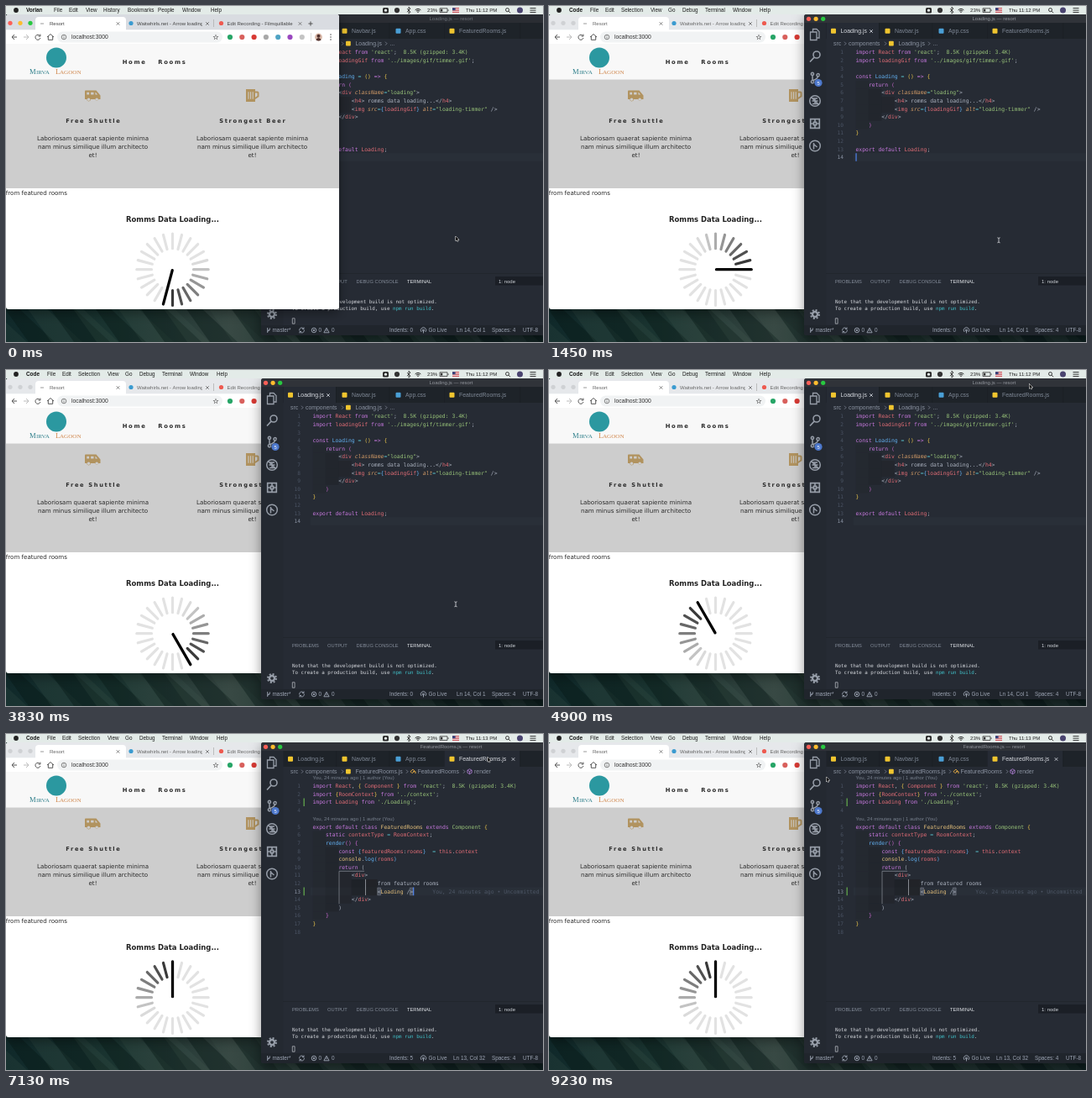
An HTML page with a canvas that plays this animation: 640 px wide and 400 px high, repeating every 9360 ms.

```html
<!DOCTYPE html>
<html lang="en">
<head>
<meta charset="utf-8">
<title>Loading screen recording</title>
<style>
html, body { margin: 0; width: 100%; height: 100%; overflow: hidden; background: #12282b; }
canvas { display: block; }
</style>
</head>
<body>
<canvas id="stage" width="640" height="400"></canvas>
<script>
const ctx = document.getElementById('stage').getContext('2d');
const SANS = '"Liberation Sans", Arial, sans-serif';
const PAGE = '"DejaVu Sans", Verdana, sans-serif';
const MONO = '"DejaVu Sans Mono", monospace';
const SERIF = '"Liberation Serif", serif';
const LOOP = 9360, FOCUS = 100, OPEN_FILE = 5820;

// ---------- helpers ----------
function rect(x, y, w, h, color, r = 0) {
  ctx.fillStyle = color;
  ctx.beginPath();
  ctx.roundRect(x, y, w, h, r);
  ctx.fill();
}

function dot(x, y, r, color) {
  ctx.fillStyle = color;
  ctx.beginPath();
  ctx.arc(x, y, r, 0, 7);
  ctx.fill();
}

// y is the middle of the capital letters
function text(s, x, y, size, color, { font = SANS, style = '', align = 'left', spacing = 0 } = {}) {
  ctx.font = `${style} ${size}px ${font}`;
  ctx.letterSpacing = spacing + 'px';
  ctx.textAlign = align;
  ctx.fillStyle = color;
  ctx.fillText(s, x, y + size * .35);
  ctx.letterSpacing = '0px';
}

function stroke(d, x, y, color, width = 1) {
  ctx.save();
  ctx.translate(x, y);
  ctx.strokeStyle = color;
  ctx.lineWidth = width;
  ctx.stroke(new Path2D(d));
  ctx.restore();
}

function fill(d, x, y, color, rule = 'nonzero') {
  ctx.save();
  ctx.translate(x, y);
  ctx.fillStyle = color;
  ctx.fill(new Path2D(d), rule);
  ctx.restore();
}

const ring = r => `M${r} 0A${r} ${r} 0 1 1 ${-r} 0A${r} ${r} 0 1 1 ${r} 0`;
const CROSS = 'M-1.8-1.8L1.8 1.8M1.8-1.8L-1.8 1.8';
const LENS = 'M1.6 1.6L3.6 3.6' + ring(2);

function windowBase(x, y, w, h, color) {
  ctx.save();
  ctx.shadowColor = 'rgba(0,0,0,.4)';
  ctx.shadowBlur = 14;
  ctx.shadowOffsetY = 4;
  rect(x, y, w, h, color, 3);
  ctx.restore();
}

function lights(x, y, gap, colors) {
  colors.forEach((c, i) => dot(x + i * gap, y, 2.6, c));
}
const RGB_LIGHTS = ['#fc5f57', '#fdbc2e', '#28c840'];

// ---------- desktop ----------
function wallpaper() {
  const g = ctx.createLinearGradient(0, 380, 640, 380);
  g.addColorStop(0, '#10292a');
  g.addColorStop(.2, '#1a3430');
  g.addColorStop(.42, '#344440');
  g.addColorStop(.6, '#1b2b2a');
  g.addColorStop(1, '#111f22');
  ctx.fillStyle = g;
  ctx.fillRect(0, 0, 640, 400);
  for (let i = 0; i < 24; i++) {
    const w = 10 + i * 29 % 23, color = i % 2 ? 'rgba(6,24,22,.4)' : 'rgba(74,98,88,.16)';
    fill(`M0 0L${w} 0L${w + 45} 42L${30} 42Z`, i * 27 - 30, 358, color);
  }
}

function menuBar(inCode, clock) {
  rect(0, 0, 640, 10, '#e3ebe8');
  dot(12, 5, 2.9, '#222');
  const app = inCode ? 'Code' : 'Vorlan';
  const names = inCode
    ? ['File', 'Edit', 'Selection', 'View', 'Go', 'Debug', 'Terminal', 'Window', 'Help']
    : ['File', 'Edit', 'View', 'History', 'Bookmarks', 'People', 'Window', 'Help'];
  const at = inCode ? [49, 67, 86, 121, 142, 159, 186, 219, 251] : [57, 75, 95, 116, 145, 181, 210, 244];
  text(app, 24, 5.1, 6.4, '#111', { style: 'bold' });
  names.forEach((n, i) => text(n, at[i], 5.1, 6.3, '#1c1c1c'));
  rect(449, 2, 7, 6.5, '#2b2b2b', 1.5);
  dot(452.5, 5.2, 1.6, '#e3ebe8');
  dot(466, 5.1, 3.1, '#333');
  stroke('M-2-2L2 2L0 4V-4L2-2L-2 2', 480, 5.1, '#222', .8);
  for (const r of [1.2, 3, 4.8]) stroke(`M${-r * .7} ${-r * .7}A${r} ${r} 0 0 1 ${r * .7} ${-r * .7}`, 491, 8.2, '#222');
  text('23%', 502, 5.1, 6.1, '#222');
  stroke('M0 0H9V4.6H0ZM10 1.5V3.2', 517, 2.8, '#333', .8);
  rect(518, 3.7, 2.3, 2.8, '#333');
  rect(532, 2.2, 8, 5.8, '#f4f0f0');
  for (let i = 0; i < 4; i++) rect(532, 2.2 + i * 1.6, 8, .8, '#c5353e');
  rect(532, 2.2, 3.6, 3, '#34437c');
  text(clock, 548, 5.1, 6, '#1c1c1c');
  stroke(LENS, 597.5, 4.6, '#222', .9);
  dot(612.5, 5, 3.5, '#4a4470');
  stroke('M0 0H7M0 2.5H7M0 5H7', 624.5, 2.6, '#222', .9);
}

// ---------- browser ----------
function browserTab(title, x, icon, closeX, color) {
  dot(x - 7, 20.5, 2.6, icon);
  ctx.save();
  ctx.beginPath();
  ctx.rect(x, 12, closeX - x - 6, 16);
  ctx.clip();
  text(title, x, 21, 6, color);
  ctx.restore();
  stroke(CROSS, closeX, 21, '#666', .8);
}

function browser(active) {
  const strip = active ? '#d9dce1' : '#e6e8eb', ink = active ? '#444' : '#666';
  windowBase(0, 10, 397, 351, '#fff');
  rect(0, 10, 397, 18.5, strip, [3, 3, 0, 0]);
  lights(5, 20.3, 12, active ? RGB_LIGHTS : Array(3).fill('#cfd1d4'));
  rect(35, 13, 108, 16, '#fff', [4, 4, 0, 0]);
  rect(41, 20.5, 4, 1, '#999');
  text('Resort', 52, 21, 6, ink);
  stroke(CROSS, 133.5, 21, '#666', .8);
  browserTab('Waitwhirls.net - Arrow loading', 156, '#3b9bd0', 240, ink);
  rect(247, 16, .7, 9, '#aaa');
  browserTab('Edit Recording - Filmquillable', 263.5, '#ee5a50', 350.5, ink);
  stroke('M-2.6 0H2.6M0-2.6V2.6', 363, 21, '#555');

  rect(0, 28.5, 397, 16.5, '#fff');
  stroke('M3 0H-3L0-3M-3 0L0 3', 10, 37, '#555');
  stroke('M-3 0H3L0-3M3 0L0 3', 24, 37, '#bbb');
  stroke('M2.4-1.5A3 3 0 1 0 2.9 1M2.9-3.4V-1H.5', 38, 37, '#555');
  stroke('M-4 0L0-3.5L4 0M-2.7-1V3.3H2.7V-1', 53, 37, '#555');
  rect(61, 30.5, 197, 13, '#f1f3f4', 6.5);
  stroke(ring(2.8) + 'M0-.5V1.6M0-1.7V-1', 69, 37, '#666', .8);
  text('localhost:3000', 78, 37, 6.8, '#333');
  fill('M0-3.6L1-1.1L3.5-1L1.5 .7L2.2 3.3L0 1.8L-2.2 3.3L-1.5 .7L-3.5-1L-1-1.1ZM0-2L-.6-.4L-2-.3L-.9.5L-1.3 2L0 1.1L1.3 2L.9.5L2-.3L.6-.4Z', 250, 37, '#666', 'evenodd');
  ['#27a567', '#d8605c', '#d83a34', '#a8a8a8', '#4fa3c4', '#9a48c0', '#c4c4c4']
    .forEach((c, i) => dot(267 + i * 14.3, 37, 3.1, c));
  rect(363, 32, .7, 10, '#ccc');
  dot(372.5, 37, 4.4, '#d9b8a8');
  dot(372.5, 35.7, 2, '#50302c');
  fill('M-3.2 3.3Q0-1.5 3.2 3.3Q0 5.8-3.2 3.3Z', 372.5, 37, '#50302c');
  for (const y of [34, 37, 40]) dot(387, y, .8, '#555');

  page();
}

function service(x, title, iconPath) {
  const o = { font: PAGE, align: 'center' };
  fill(iconPath, x, 106.5, '#b1935f', 'evenodd');
  text(title, x + .8, 137, 6.67, '#2a2a2a', { ...o, style: 'bold', spacing: 1.67 });
  ['Laboriosam quaerat sapiente minima', 'nam minus similique illum architecto', 'et!']
    .forEach((line, i) => text(line, x, 157.2 + i * 10, 7.1, '#2a2a2a', o));
}

function page() {
  const bold = { font: PAGE, style: 'bold', spacing: 1.67 };
  rect(0, 45, 397, 42.5, '#f8f8f8');
  dot(60, 61.5, 12, '#2b98a0');
  text('M', 28, 78, 8.6, '#2f7f8b', { font: SERIF });
  text('IRVA', 36, 78.4, 7.1, '#2f7f8b', { font: SERIF });
  text('L', 59, 78, 8.6, '#cf8448', { font: SERIF });
  text('AGOON', 64, 78.4, 7.1, '#cf8448', { font: SERIF });
  text('Home', 138.7, 66.5, 6.8, '#2a2a2a', bold);
  text('Rooms', 181.3, 66.5, 6.8, '#2a2a2a', bold);
  rect(0, 87.5, 397, 129.5, '#cdcdcd');
  service(103.5, 'Free Shuttle',
    'M-9-6H4L9 0V4.5H7A2.4 2.4 0 0 1 2.4 4.5H-2.5A2.4 2.4 0 0 1-7.3 4.5H-9.5V-5ZM-7.2-3.7V-1H-4.4V-3.7ZM-2.4-3.7V-1H1V-3.7ZM3-3.7V-1H5.6L3.3-3.7ZM-6.8 4.8A1.8 1.8 0 1 0-3.2 4.8A1.8 1.8 0 1 0-6.8 4.8ZM2.9 4.8A1.8 1.8 0 1 0 6.5 4.8A1.8 1.8 0 1 0 2.9 4.8Z');
  service(293.5, 'Strongest Beer',
    'M-7.5-7.5H3.5V-5H6Q8-5 8-3V1.5L3.5 4.5V7.5H-7.5ZM3.5-3V2.2L6 .6V-3ZM-5-4.3V4.3H-4V-4.3ZM-2.4-4.3V4.3H-1.4V-4.3ZM.2-4.3V4.3H1.2V-4.3Z');
  text('from featured rooms', -.2, 222.5, 7.1, '#2a2a2a', { font: PAGE });
  text('Romms Data Loading...', 198.5, 254, 8.48, '#222', { font: PAGE, style: 'bold', align: 'center' });
}

// 24 spokes, the long one steps by 15 degrees and the ones behind it fade out
function spinner(t) {
  const head = 13 + Math.floor(t / 86.5 + .8);
  ctx.save();
  ctx.translate(198.5, 313.7);
  ctx.lineCap = 'round';
  for (let behind = 23; behind >= 0; behind--) {
    const a = (head - behind) * Math.PI / 12, v = behind ? Math.min(226, 34 + behind * 23) : 0;
    const from = behind ? 25 : 1;
    ctx.strokeStyle = `rgb(${v},${v},${v})`;
    ctx.lineWidth = behind ? 3.2 : 3.3;
    ctx.beginPath();
    ctx.moveTo(Math.sin(a) * from, -Math.cos(a) * from);
    ctx.lineTo(Math.sin(a) * 42.7, -Math.cos(a) * 42.7);
    ctx.stroke();
  }
  ctx.restore();
}

// ---------- editor ----------
const CHAR = 3.86, CODE_X = 365.5;
const INK = { p: '#c678dd', r: '#e06c75', g: '#98c379', w: '#abb2bf', y: '#e5c07b', b: '#61afef',
  o: '#d19a66', c: '#56b6c2', k: '#e8c34a', m: '#c566c9', d: '#4d5665' };

// Each token is a colour letter followed by its text, tokens are divided by |
const LOADING = [
  "pimport |rReact |pfrom |g'react'|w;  |g8.5K (gzipped: 3.4K)",
  "pimport |rloadingGif |pfrom |g'../images/gif/timmer.gif'|w;",
  '',
  'pconst |bLoading |c= |k() |p=> |k{',
  'w    |preturn |m(',
  'w        <|rdiv |oclassName|c=|g"loading"|w>',
  'w            <|rh4|w> romms data loading...</|rh4|w>',
  'w            <|rimg |osrc|c=|b{|rloadingGif|b} |oalt|c=|g"loading-timmer" |w/>',
  'w        </|rdiv|w>',
  'w    |m)',
  'k}',
  '',
  'pexport default |rLoading|w;',
  ''
];
const ROOMS = [
  "pimport |rReact|w, |k{ |rComponent |k} |pfrom |g'react'|w;  |g8.5K (gzipped: 3.4K)",
  "pimport |k{|rRoomContext|k} |pfrom |g'../context'|w;",
  "pimport |rLoading |pfrom |g'./Loading'|w;",
  '',
  'pexport default class |yFeaturedRooms |pextends |gComponent |k{',
  'w    |pstatic |rcontextType |c= |rRoomContext|w;',
  'w    |brender|m() {',
  'w        |pconst |b{|rfeaturedRooms|w:|rrooms|b}  |c= |rthis|w.|rcontext',
  'w        |yconsole|w.|blog|b(|rrooms|b)',
  'w        |preturn |w(',
  'w            <|rdiv|w>',
  'w                    from featured rooms',
  'w                    <|yLoading |w/>|d      You, 24 minutes ago • Uncommitted changes',
  'w            </|rdiv|w>',
  'w        )',
  'w    |m}',
  'k}',
  ''
];

function codeLine(line, n, y, current) {
  text(n, 351, y, 6.2, n === current ? '#8a93a3' : '#4a5363', { font: MONO, align: 'right' });
  let x = CODE_X;
  for (const token of line.split('|')) {
    text(token.slice(1), x, y, 6.42, INK[token[0]] || INK.w, { font: MONO, style: token[0] === 'o' ? 'italic' : '' });
    x += Math.max(0, token.length - 1) * CHAR;
  }
}

function indents(lines, yOf) {
  lines.forEach((line, i) => {
    const cols = /^w( +)/.exec(line.split('|')[0]);
    const depth = cols ? Math.floor(cols[1].length / 4) : 0;
    for (let d = 0; d < depth; d++)
      rect(CODE_X + d * 4 * CHAR, yOf(i) - 4.8, 4 * CHAR, 9.6, `rgba(${d % 2 ? '20,24,26' : '30,30,32'},${.15 + d * .1})`);
  });
}

function caret(x, y) { rect(x, y - 4.8, 1.1, 9.6, '#528bff'); }

function editorCode(t) {
  const inRooms = t >= OPEN_FILE, lines = inRooms ? ROOMS : LOADING;
  const current = inRooms ? 13 : 14;
  const yOf = i => inRooms ? 62 + i * 9.6 + (i > 3 ? 10.2 : 0) : 55.2 + i * 9.6;
  const y = yOf(current - 1);
  rect(363, y - 4.8, 277, 9.6, '#292f38');
  indents(lines, yOf);
  if (inRooms) {
    const age = t < 7000 ? 23 : 24;
    for (const lensY of [52, 101]) text(`You, ${age} minutes ago | 1 author (You)`, 365.5, lensY, 6, '#78808e');
    for (const i of [2, 12]) rect(354.5, yOf(i) - 4.8, 1.4, 9.6, '#5c9c4a');
    stroke('M30 0H0V39', 397, 163.3, '#8d939c', .7);
    rect(428, 173, .8, 19, '#a0a5ad');
    for (const c of [20, 30]) {
      rect(CODE_X + c * CHAR, y - 4.4, CHAR, 8.8, '#4b515c');
      stroke(`M0 0H${CHAR}V8.8H0Z`, CODE_X + c * CHAR, y - 4.4, '#7d838d', .5);
    }
  }
  lines.forEach((line, i) => codeLine(line, i + 1, yOf(i), current));
  const blinkStart = inRooms ? 5720 : 260;
  if (t >= FOCUS && (t - blinkStart) % 1000 < 500) caret(inRooms ? CODE_X + 31 * CHAR : CODE_X, y);
}

function fileTab(name, x, textX, w, active, closable, isCss) {
  if (active) rect(x, 20, w, 19, '#262b34');
  rect(x + w, 20, .6, 19, '#1a1e24');
  rect(textX - 11.5, 26.8, 6, 6, isCss ? '#4a9fd6' : '#f0c52f', 1);
  text(name, textX, 30, 6.9, active ? '#d7dae0' : '#7f8896');
  if (closable) stroke(CROSS, textX + w - 25.5, 30, '#c8ccd4', .9);
}

function breadcrumb(inRooms) {
  const ink = '#8b93a1', sep = x => stroke('M-1-2L1 0L-1 2', x, 44.7, ink, .7);
  const name = inRooms ? 'FeaturedRooms' : 'Loading';
  text('src', 339, 44.7, 6.9, ink);
  sep(353);
  text('components', 357, 44.7, 6.9, ink);
  sep(401);
  rect(405, 41.7, 5.8, 5.8, '#f0c52f', 1);
  text(name + '.js', 416.5, 44.7, 6.9, ink);
  sep(inRooms ? 478 : 453);
  if (!inRooms) return text('...', 457.5, 44.7, 6.9, ink);
  stroke('M-3 0L0-2.6L2-.6L-1 2ZM0 0H3V2.4', 485, 44.7, '#d9a343');
  text(name, 490.5, 44.7, 6.9, ink);
  sep(546);
  stroke('M0-3L2.6-1.5V1.5L0 3L-2.6 1.5V-1.5ZM-2.6-1.5L0 0L2.6-1.5M0 0V3', 552.5, 44.7, '#b180d7', .8);
  text('render', 558, 44.7, 6.9, ink);
}

function activityBar() {
  const ink = '#969da8', icon = (d, y, w = 1.5) => stroke(d, 317, y, ink, w);
  icon('M-5.5-3H2V6.5H-5.5ZM-2.5-3V-6.5H2L5-3.5V4H2', 34, 1.3);
  icon('M-1.2 1.4L-6 6.5M6 -2A4 4 0 1 1-2-2A4 4 0 1 1 6-2', 60, 1.6);
  icon('M-3-3V3M-3-3A1.6 1.6 0 1 0-3.1-3M-1.4 4.6A1.6 1.6 0 1 0-1.4 4.7M5.2-3.4A1.6 1.6 0 1 0 5.2-3.3M3.6-1.8Q3 1.5-2.4 3', 85.5);
  dot(321, 91.5, 4.6, '#4d78cc');
  text('5', 321, 91.6, 5.8, '#fff', { align: 'center' });
  icon(ring(6.3) + 'M-4.5-4.5L4.5 4.5M-3.5 0H3.5M0-3.5V4M-3-3L3-3M-3 3.4H3', 113);
  icon('M-5.3-5.3H5.3V5.3H-5.3ZM-1.6-1.6H1.6V1.6H-1.6ZM0-5V-2M0 2V5M-5 0H-2M2 0H5', 140, 1.7);
  icon(ring(6.3) + 'M-1.5-3.5V4M-1.5-2L2.5 1.5', 166.5);
  icon(ring(3), 367, 2.4);
  ctx.setLineDash([2, 1.93]);
  icon(ring(5), 367, 2);
  ctx.setLineDash([]);
}

function panel() {
  rect(330, 318, 310, .8, '#1f242b');
  const tabs = { PROBLEMS: 341, OUTPUT: 383, 'DEBUG CONSOLE': 417.5, TERMINAL: 478 };
  for (const [name, x] of Object.entries(tabs)) text(name, x, 327.8, 5.75, name === 'TERMINAL' ? '#e1e4e8' : '#858d9a');
  rect(583, 322, 57, 10.5, '#1b1f26');
  text('1: node', 587, 327.6, 6, '#d0d4da');
  const mono = { font: MONO }, w = 5.86 * .602;
  text('Note that the development build is not optimized.', 341, 352.2, 5.86, '#d4d7dc', mono);
  text('To create a production build, use', 341, 360.2, 5.86, '#d4d7dc', mono);
  text('npm run build', 341 + 34 * w, 360.2, 5.86, '#41c1c9', mono);
  text('.', 341 + 47 * w, 360.2, 5.86, '#d4d7dc', mono);
  stroke('M0 0H2.8V6.4H0Z', 341.3, 371.8, '#c5c8cd', .7);
}

function statusBar(inRooms) {
  const ink = '#9da5b4', put = (s, x) => text(s, x, 386, 6.4, ink);
  rect(304, 380, 336, 12, '#20252c', [0, 0, 0, 3]);
  stroke('M-1.3-3V3M1.5-2.5Q2 .6-1.3 1.3' + ring(.3), 313, 386, ink, .9);
  put('master*', 317.5);
  stroke('M-2.8 .5A2.8 2.8 0 0 1 2.2-1.8M2.8-.5A2.8 2.8 0 0 1-2.2 1.8M2.5-3.5V-1.5H.5M-2.5 3.5V1.5H-.5', 352.5, 386, ink, .9);
  stroke(ring(2.8) + 'M-1.2-1.2L1.2 1.2M1.2-1.2L-1.2 1.2', 367, 386, ink, .9);
  put('0', 372.5);
  stroke('M0-2.8L3.1 2.8H-3.1ZM0-.8V1.2', 382, 386, ink, .9);
  put('0', 388);
  put(inRooms ? 'Indents: 5' : 'Indents: 0', 457);
  stroke('M-2.4 2A3.2 3.2 0 1 1 2.4 2M0 0V3.5' + ring(1.1), 497.5, 386, ink, .9);
  put('Go Live', 503.5);
  put(inRooms ? 'Ln 13, Col 32' : 'Ln 14, Col 1', inRooms ? 533 : 537);
  put('Spaces: 4', 579);
  put('UTF-8', 616);
}

function editor(t) {
  const inRooms = t >= OPEN_FILE;
  windowBase(304, 10, 340, 382, '#262b34');
  rect(304, 10, 336, 10, t < FOCUS ? '#2a2d33' : '#303339', [3, 0, 0, 0]);
  lights(309.5, 15.3, 8.6, RGB_LIGHTS);
  text((inRooms ? 'FeaturedRooms' : 'Loading') + '.js — resort', 530.5, 15.2, 6, t < FOCUS ? '#6d7279' : '#92969d', { align: 'center' });
  rect(304, 20, 26.5, 360, '#242931');
  rect(330.5, 20, 309.5, 19, '#1e2329');
  fileTab('Loading.js', 331, 347.5, 62, !inRooms, !inRooms);
  fileTab('Navbar.js', 393.5, 412, 63, false, false);
  fileTab('App.css', 457, 476, 65, false, false, true);
  fileTab('FeaturedRooms.js', 522.5, 540, 90, inRooms, inRooms || t > 5200);
  activityBar();
  editorCode(t);
  breadcrumb(inRooms);
  panel();
  statusBar(inRooms);
}

// ---------- pointer ----------
const PATH = [[0, 536, 274], [4040, 536, 274], [4450, 573, 3], [4640, 573, 3], [4860, 572.5, 16.5],
  [5100, 572.5, 16.5], [5650, 574, 27.5], [8900, 574, 27.5], [9230, 330.5, 51], [LOOP, 330.5, 51]];

function pointer(t) {
  const i = PATH.findIndex(p => p[0] > t);
  const [t0, x0, y0] = PATH[i - 1], [t1, x1, y1] = PATH[i];
  const u = (t - t0) / (t1 - t0), e = u * u * (3 - 2 * u);
  const x = x0 + (x1 - x0) * e, y = y0 + (y1 - y0) * e;
  if (t >= FOCUS && x > 340 && y > 48) {
    stroke('M-1.6-3Q0-3 0-2Q0-3 1.6-3M0-2.2V2.2M-1.6 3Q0 3 0 2Q0 3 1.6 3', x, y + 4.8, '#d8dade', .8);
    return;
  }
  const arrow = 'M0 0V5.6L1.3 4.5L2.1 6.3L3 5.9L2.2 4.1H3.9Z';
  stroke(arrow, x, y, '#fff', 1);
  fill(arrow, x, y, '#111');
}

// ---------- timing ----------
const RUNS = [0, 100, 400, 1450, 2110, 2900, 3430, 3570, 4100, 4630, 4900, 5820, 6480, 7920, 8960, 9230, LOOP];

function hold(t) {
  const i = RUNS.findIndex(start => start > t);
  const start = RUNS[i - 1], steps = Math.max(1, Math.round((RUNS[i] - start) / 131));
  return start + 130 * Math.min(steps - 1, Math.floor((t - start) / 130));
}

function draw(t) {
  const inCode = t >= FOCUS;
  const showBrowser = () => { browser(!inCode); spinner(t); };
  wallpaper();
  if (inCode) {
    showBrowser();
    editor(t);
  } else {
    editor(t);
    showBrowser();
  }
  menuBar(inCode, t < OPEN_FILE ? 'Thu 11:12 PM' : 'Thu 11:13 PM');
  pointer(t);
}

function tick() {
  draw(hold(performance.now() % LOOP));
  requestAnimationFrame(tick);
}
tick();
</script>
</body>
</html>
```
